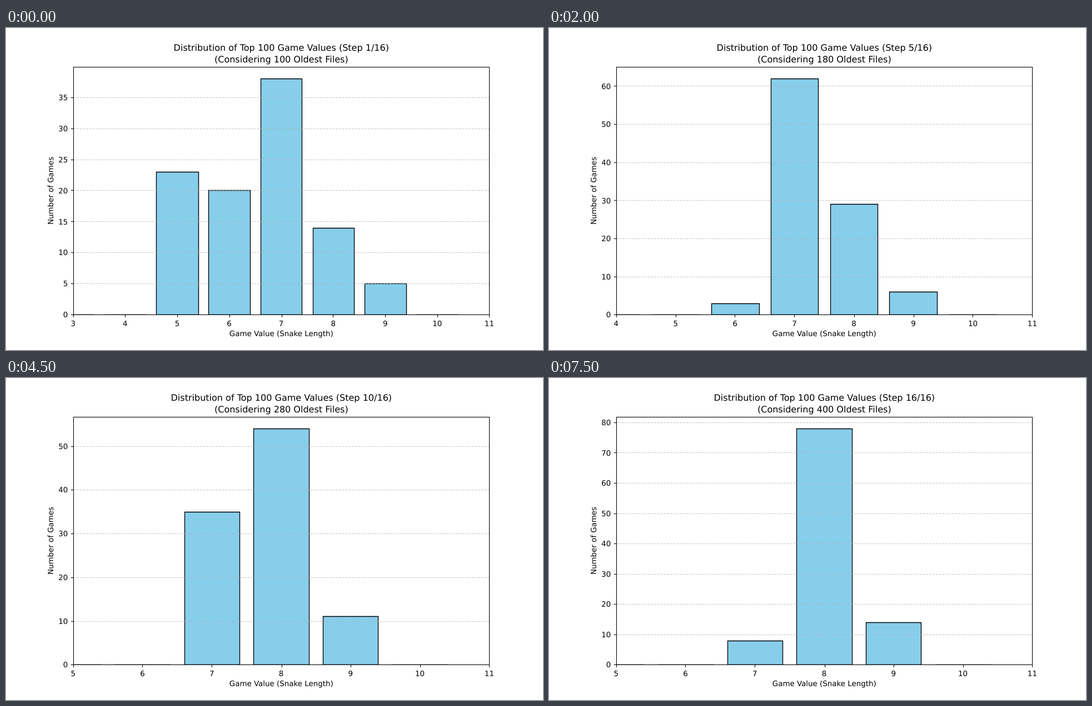
An HTML page for the animation above (8 s loop, 966 by 580 pixels).

```html
<!DOCTYPE html>
<html lang="en">
<head>
<meta charset="utf-8">
<title>Game value distribution</title>
<style>
  html, body { margin: 0; width: 100%; height: 100%; overflow: hidden; background: #fff; }
  svg { display: block; }
  text { font-family: "DejaVu Sans", sans-serif; font-size: 13.42px; text-anchor: middle; text-rendering: geometricPrecision; }
  .title { font-size: 16.05px; }
  .end { text-anchor: end; }
  .bar { fill: #87ceeb; stroke: #000; stroke-width: 1.34; }
  .grid { stroke: #b0b0b0; stroke-width: 1.07; stroke-dasharray: 3.97 1.72; opacity: .7; }
  .axis { fill: none; stroke: #000; stroke-width: 1.07; }
</style>
</head>
<body>
<svg id="stage" width="966" height="580" viewBox="0 0 966 580">
  <defs><clipPath id="plot"><rect x="121" y="70" width="749" height="447"/></clipPath></defs>
  <g id="chart"></g>
  <rect class="axis" x="121.5" y="70.5" width="748" height="446"/>
  <text id="head" class="title" x="495.3" y="41.2"></text>
  <text id="sub" class="title" x="495.3" y="61.6"></text>
  <text x="495.3" y="555">Game Value (Snake Length)</text>
  <text transform="translate(85.4 293) rotate(-90)">Number of Games</text>
</svg>
<script>
const STEPS = 16, STEP_MS = 500, TOP_GAMES = 100, HIGH = 11;

// The chart is laid out on a 1000 by 600 sheet, then scaled to the stage.
const LEFT = 125, RIGHT = 900, TOP = 72, BOTTOM = 534;
const SCALE_X = 966 / 1000, SCALE_Y = 580 / 600;

// Games of length 8 and 9 found so far: [step, eights, nines].
const keys = [[0, 14, 5], [2, 22, 5], [5, 33, 6], [7, 45, 7], [9, 54, 11], [13, 67, 12], [15, 78, 14]];

const byId = id => document.getElementById(id);
const snap = (v, scale) => Math.floor((Math.round(v) + 0.5) * scale) + 0.5;
const line = (cls, x1, y1, x2, y2) =>
  `<line class="${cls}" x1="${x1}" y1="${y1}" x2="${x2}" y2="${y2}"/>`;
const label = (cls, x, y, value) => `<text class="${cls}" x="${x}" y="${y}">${value}</text>`;

function between(step, column) {
  const n = Math.max(1, keys.findIndex(key => key[0] >= step));
  const a = keys[n - 1], b = keys[n];
  return Math.round(a[column] + (b[column] - a[column]) * (step - a[0]) / (b[0] - a[0]));
}

// The pool keeps growing, but only its best games are counted.
function countGames(step) {
  const pool = { 9: between(step, 2), 8: between(step, 1), 7: 38 + 6 * step, 6: 20 + 4 * step, 5: TOP_GAMES };
  const counts = {};
  let left = TOP_GAMES;
  for (let v = 9; left > 0; v--) {
    counts[v] = Math.min(pool[v], left);
    left -= counts[v];
  }
  return counts;
}

function drawStep(step) {
  const counts = countGames(step);
  const low = Math.min(...Object.keys(counts)) - 2;
  const yMax = Math.max(...Object.values(counts)) * 1.05;
  const tick = yMax <= 45 ? 5 : 10;
  const xAt = v => LEFT + (v - low) / (HIGH - low) * (RIGHT - LEFT);
  const yAt = v => BOTTOM - v / yMax * (BOTTOM - TOP);
  const xLine = v => snap(xAt(v), SCALE_X);
  const yLine = v => snap(yAt(v), SCALE_Y);
  let bars = "", grid = "", axes = "";

  for (let v = low; v <= HIGH; v++) {
    const x = xLine(v);
    axes += line("axis", x, 516.5, x, 521.2) + label("", xAt(v) * SCALE_X, 536.5, v);
    if (v < HIGH) {
      bars += `<path class="bar" d="M${xLine(v - 0.4)} ${yLine(0)}H${xLine(v + 0.4)}V${yLine(counts[v] || 0)}H${xLine(v - 0.4)}Z"/>`;
    }
  }
  for (let v = 0; v <= yMax; v += tick) {
    const y = yLine(v);
    if (v) grid += line("grid", 121, y, 870, y);
    axes += line("axis", 116.8, y, 121.5, y) + label("end", 111.4, yAt(v) * SCALE_Y + 5.2, v);
  }
  byId("chart").innerHTML = `<g clip-path="url(#plot)">${bars}${grid}</g>${axes}`;
  byId("head").textContent = `Distribution of Top ${TOP_GAMES} Game Values (Step ${step + 1}/${STEPS})`;
  byId("sub").textContent = `(Considering ${100 + step * 20} Oldest Files)`;
}

let shown = -1;
const start = performance.now();
function update() {
  const elapsed = Math.max(0, performance.now() - start);
  const step = Math.floor(elapsed / STEP_MS) % STEPS;
  if (step !== shown) drawStep(shown = step);
  requestAnimationFrame(update);
}
update();
</script>
</body>
</html>
```
